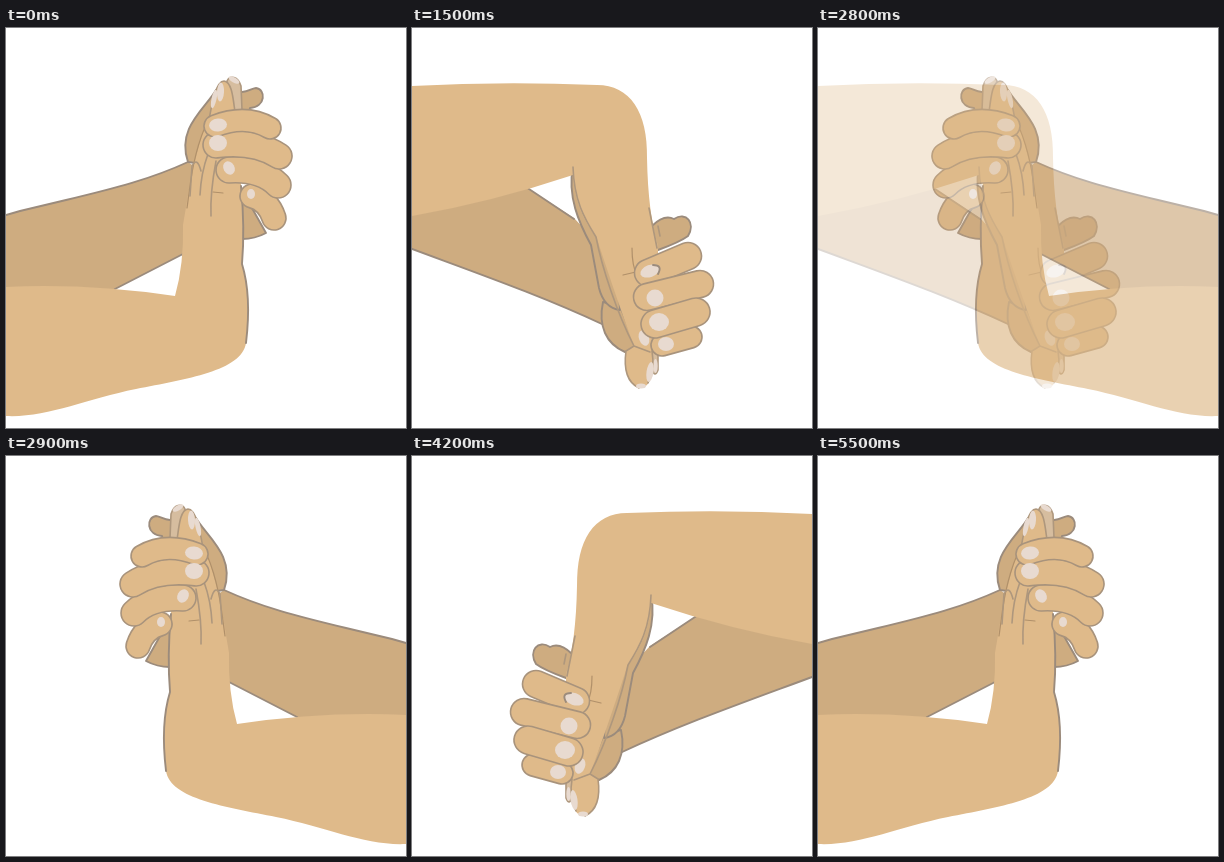
An HTML page that plays this animation: 400 by 400 pixels, repeating every 5700 ms.

```html
<!DOCTYPE html>
<html lang="en">
<head>
<meta charset="utf-8">
<title>Hand stretch</title>
<style>
html, body { margin: 0; width: 100%; height: 100%; overflow: hidden; background: #fff; }
svg { display: block; width: 100vw; height: 100vh; }
path { fill: none; stroke-linecap: round; stroke-linejoin: round; }
.skin { fill: #dfba8a; }
.shade { fill: #ceac80; }
.pale { fill: #d6bd9f; }
.nail { fill: #e8dad0; }
.edge { stroke: #9b8b7c; stroke-width: 1.9; }
.line { stroke: #ae977d; stroke-width: 1.6; }
.thin { stroke: #b0906a; stroke-width: 1.2; }
.rim { stroke: #a8937c; }
.flesh { stroke: #dfba8a; }
</style>
</head>
<body>
<svg viewBox="0 0 400 400"></svg>
<script>
const LOOP = 5700;
const RIM = 1.6;

const shape = (cls, d) => `<path class="${cls}" d="${d}"/>`;

// A bent finger: a thick round stroke with a rim
const finger = (d, width) =>
  `<path class="rim" d="${d}" stroke-width="${width + RIM}"/>` +
  `<path class="flesh" d="${d}" stroke-width="${width - RIM}"/>`;

const nail = (x, y, rx, ry, turn = 0) =>
  `<ellipse class="nail" rx="${rx}" ry="${ry}" transform="translate(${x} ${y}) rotate(${turn})"/>`;

const handUp = [
  // far arm and hand
  shape('shade', 'M0 187L14 183 60 172C110 160 145 151 182 134L205 150 190 219 109 261 80 275H0Z'),
  shape('edge', 'M0 187L14 183 60 172C110 160 145 151 182 134M109 261L177 226'),
  shape('shade edge', 'M182 134C170 100 200 80 210 62L236 64C242 64 247 60 250 60C260 61 260 79 244 80L225 140Z'),
  shape('shade edge', 'M233 157L260 205Q249 211 236 211Z'),
  shape('pale line', 'M221 53C224 47 232 48 235 58L236 82 226 84Z'),
  nail(228, 52, 6, 2.5, 30),
  shape('skin line', 'M203 92C206 75 210 53 218 53C226 54 227 70 229 84'),
  nail(208, 71, 2.5, 9.5, 12),
  nail(214.5, 64, 3.5, 9.5, 3),
  // near arm
  shape('skin', 'M0 259Q80 255 169 268Q178 236 177 197C180 180 183 160 187 139L199 96 235 110V160Q239 200 236 236' +
    'C244 262 243 290 240 315C236 343 180 351 130 361C80 371 40 390 0 388Z'),
  shape('edge', 'M235 158Q239 200 236 236C244 262 243 290 240 315'),
  shape('thin', 'M181 180C184 160 186 130 199 99M207 164L217 165'),
  shape('line', 'M184 168L186 138Q191 128 195 143M194 167Q195 145 202 126M205 188Q204 165 210 133'),
  // fist
  finger('M246 168Q262 172 268 190', 24),
  finger('M223 142Q255 140 272 157', 26),
  finger('M210 117Q248 112 273 128', 26),
  finger('M209 98Q240 86 264 100', 22),
  nail(212, 97, 9, 6.5, -5),
  nail(212, 115, 9, 8),
  nail(223, 140, 5.5, 7, -30),
  nail(245, 166, 4, 5)
];

const handDown = [
  // far arm and hand
  shape('shade', 'M0 180L114 159 162 190 195 225 205 297H192C130 268 70 247 0 221Z'),
  shape('edge', 'M114 159L162 191M0 221C70 247 130 268 192 297'),
  shape('shade edge', 'M240 198Q252 186 262 191C274 183 284 195 276 208Q268 214 246 222'),
  shape('line', 'M246 198L248 208'),
  shape('shade edge', 'M191 274C186 298 194 316 213 324L225 320 208 278Z'),
  shape('shade edge', 'M161 139C155 168 167 195 179 217L187 260Q192 280 208 282L205 225Z'),
  shape('pale line', 'M238 318L240 342Q243 350 246 342V326'),
  nail(243.5, 338, 2.2, 7),
  // near arm
  shape('skin', 'M0 58Q90 53 185 57C218 57 236 84 235 130Q236 185 246 218V290L238 352Q234 361 227 360' +
    'Q210 352 214 323L222 318Q206 275 185 211Q162 180 161 147Q80 174 0 188Z'),
  shape('line', 'M161 139C162 172 172 190 184 209C190 240 205 285 222 318' +
    'L214 323Q210 352 227 360M222 318L238 324M237 180L245 220M240 323Q243 340 236 355'),
  nail(229, 358, 5, 2.5),
  nail(238, 344, 3.5, 10, 8),
  nail(232, 310, 5, 8, -20),
  shape('thin', 'M220 220Q220 238 225 247M211 247L228 243'),
  // fist
  finger('M236 245L276 228', 27),
  finger('M235 269L288 256', 27),
  finger('M250 317L279 309', 22),
  finger('M243 296L284 284', 28),
  nail(238, 243, 10, 6, -20),
  shape('edge', 'M241 237Q251 237 246 246'),
  nail(243, 270, 8.5, 8.5),
  nail(247, 294, 10, 9),
  nail(254, 316, 8, 7)
];

const layer = (id, parts, flip) =>
  `<g id="${id}" ${flip ? 'transform="matrix(-1 0 0 1 400 0)"' : ''}>` +
  `<rect width="400" height="400" fill="#fff"/>${parts.join('')}</g>`;

document.querySelector('svg').innerHTML =
  layer('upRight', handUp) + layer('downRight', handDown) +
  layer('upLeft', handUp, true) + layer('downLeft', handDown, true);

// opacity steps of each layer: [ms, opacity]
const fades = {
  downRight: [[0, 0], [1400, .67], [1500, 1], [2900, 0]],
  upLeft: [[0, 0], [2700, .33], [2800, .67], [2900, 1], [4200, 0]],
  downLeft: [[0, 0], [4100, .67], [4200, 1], [5400, .67], [5500, 0]]
};

for (const [id, steps] of Object.entries(fades)) {
  const frames = [...steps, [LOOP, 0]].map(([t, opacity]) =>
    ({ offset: t / LOOP, opacity, easing: 'steps(1, end)' }));
  document.getElementById(id).animate(frames, { duration: LOOP, iterations: Infinity });
}
</script>
</body>
</html>
```
